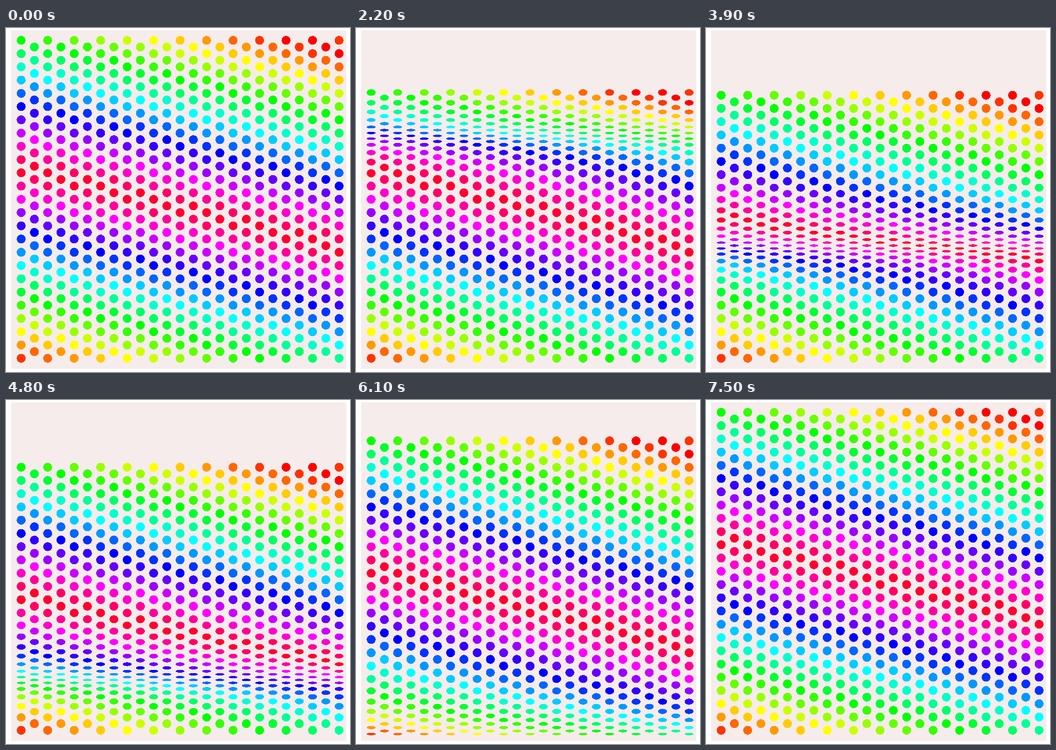
An HTML page with a canvas for the animation above (7600 ms loop, 748 by 748 pixels).

```html
<!DOCTYPE html>
<html lang="en">
<head>
<meta charset="utf-8">
<title>Compression pulse</title>
<style>
  html, body { margin: 0; width: 100%; height: 100%; overflow: hidden; background: #fff; }
  canvas { display: block; }
</style>
</head>
<body>
<canvas id="stage" width="748" height="748"></canvas>
<script>
const ctx = document.getElementById('stage').getContext('2d');

const STEP_MS = 100, LOOP_MS = 7600;
const ROWS = 49, COLS = 25;
const LEFT = 33, FLOOR = 732.5;
const COL_GAP = 28.8, ROW_GAP = 14.4;
const RADIUS = 9.6;
const PULSE = 25;     // pulse length in rows
const SQUEEZE = 1.7;  // dot height lost per pixel of lost row gap

// Lost gap at place k of the pulse: slow rise, flat top, steep front.
function lostGap(k) {
  return Math.max(0, Math.min(0.59 * (k + 1), 8.2, 0.91 * (PULSE - k)));
}

// Hues run back and forth over 30 steps.
function dotColor(row, col) {
  const s = (10 + row - Math.floor(col / 2) + 60) % 60;
  return `hsl(${12 * (s < 30 ? s : 59 - s)}, 100%, 50%)`;
}

// Ellipse filled in whole pixels, without soft edges.
function fillDot(cx, cy, rx, ry) {
  ctx.beginPath();
  const bottom = Math.round(cy + ry);
  for (let y = Math.round(cy - ry); y < bottom; y++) {
    const v = (y + 0.5 - cy) / ry;
    const half = rx * Math.sqrt(Math.max(0, 1 - v * v));
    const x = Math.round(cx - half);
    ctx.rect(x, y, Math.round(cx + half) - x, 1);
  }
  ctx.fill();
}

function draw(step) {
  ctx.fillStyle = '#fff';
  ctx.fillRect(0, 0, 748, 748);
  ctx.fillStyle = '#f6ecec';
  ctx.fillRect(11, 5, 729, 736);

  // Rows stack upwards from the fixed floor.
  let y = FLOOR;
  for (let row = ROWS - 1; row >= 0; row--) {
    const lost = lostGap(row - step + PULSE);
    y -= ROW_GAP - lost;
    for (let col = row % 2; col < COLS; col += 2) {
      ctx.fillStyle = dotColor(row, col);
      fillDot(LEFT + COL_GAP * col, y, RADIUS, RADIUS - SQUEEZE * lost / 2);
    }
  }
}

const start = performance.now();
let shown = -1;

function tick() {
  const t = (performance.now() - start) % LOOP_MS;
  const step = Math.max(0, Math.floor(t / STEP_MS) - 1);
  if (step !== shown) {
    draw(step);
    shown = step;
  }
  requestAnimationFrame(tick);
}
tick();
</script>
</body>
</html>
```
